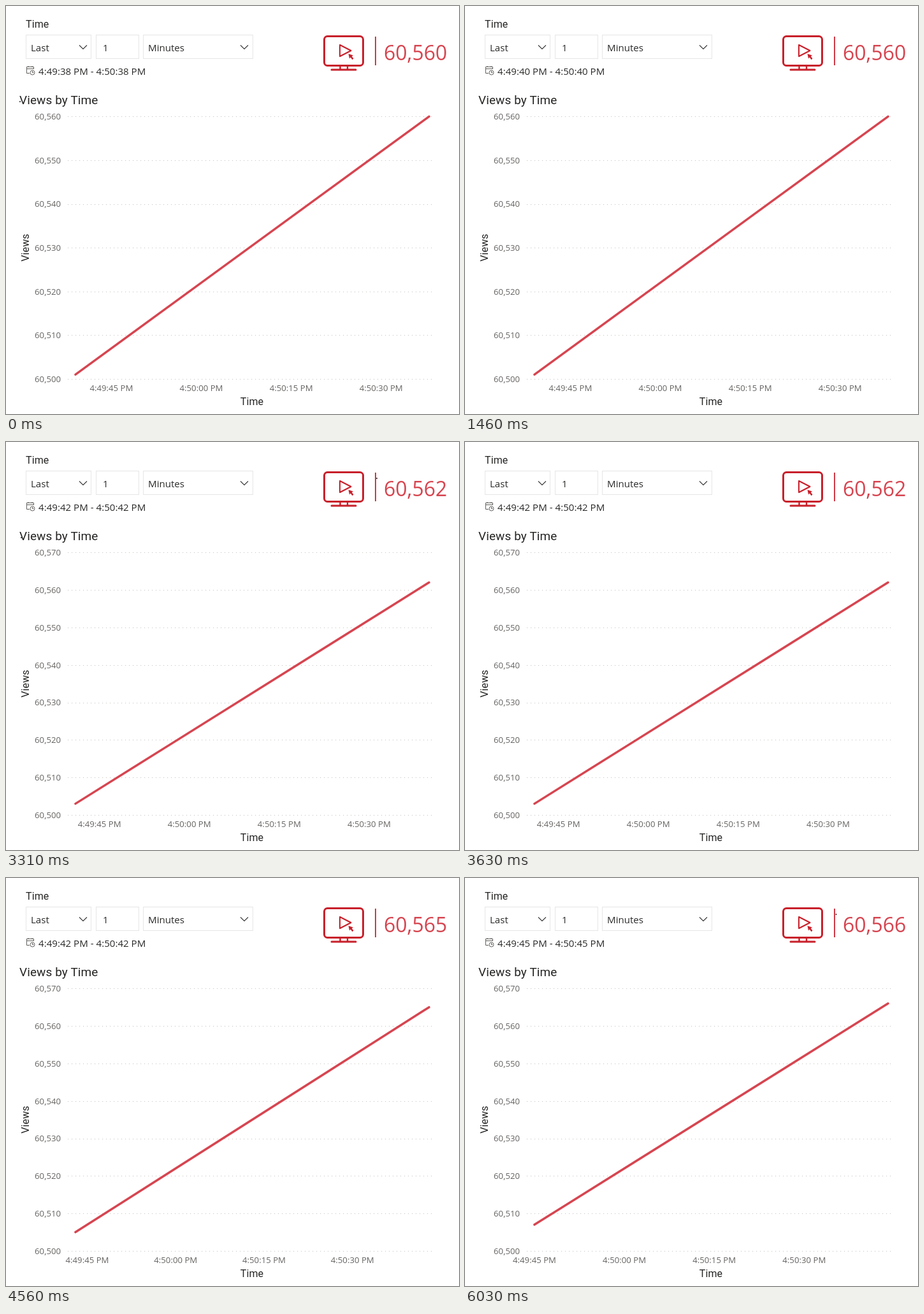
Write an HTML page that moves like this. It is 711 px wide and 640 px high and loops after 6.11 s.

```html
<!DOCTYPE html>
<html lang="en">
<head>
<meta charset="utf-8">
<title>Views by Time</title>
<style>
  html, body { margin: 0; width: 100%; height: 100%; overflow: hidden; background: #fff; }
  svg { display: block; width: 711px; height: 640px; }
  text { font: 15.1px "Open Sans", "Noto Sans", sans-serif; fill: #2b2a29; }
  .head { font: 16px Roboto, sans-serif; fill: #252423; letter-spacing: .1px; }
  .title { font-size: 19px; }
  .tick { font-size: 13.2px; fill: #666462; }
  .card { font-size: 32px; fill: #d64550; }
  .end { text-anchor: end; }
  .mid { text-anchor: middle; }
  .shape { fill: none; }
  .box { stroke: #e6e6e6; }
  .thin { stroke: #3b3a39; stroke-width: 1.1; }
  .small { stroke: #605e5c; stroke-width: 1; }
  .grid { stroke: #c8c6c4; stroke-dasharray: 1.2 4.8; }
  .icon { stroke: #c8202b; stroke-width: 3; stroke-linecap: round; stroke-linejoin: round; }
  .line { stroke: #d64550; stroke-width: 3.5; stroke-linecap: round; stroke-linejoin: round; }
</style>
</head>
<body>
<svg viewBox="0 0 711 640">
  <text class="head" x="31" y="34">Time</text>
  <g class="shape box">
    <rect x="31.5" y="45.5" width="102" height="37"/>
    <rect x="141.5" y="45.5" width="67" height="37"/>
    <rect x="215.5" y="45.5" width="172" height="37"/>
  </g>
  <text x="39" y="71">Last</text>
  <text x="152" y="71">1</text>
  <text x="223" y="71">Minutes</text>
  <path class="shape thin" d="M115 61.5l6 6 6-6M368 61.5l6 6 6-6"/>
  <path class="shape small" d="M37 105.5H32.5V95.5H43.5V99M32.5 98.5H43.5M35 94V96M41 94V96M41.5 102V104.5H43.5"/>
  <circle class="shape small" cx="41.5" cy="104.5" r="3.5"/>
  <text id="range" x="51" y="108"></text>

  <g class="shape icon">
    <rect x="499.5" y="47.5" width="61" height="46" rx="5"/>
    <path d="M511 100H549" />
    <path d="M524.5 94V99M536 94V99" stroke-width="2.5"/>
    <path d="M524 61V79L541.5 70Z" stroke-width="2"/>
  </g>
  <path d="M537.5 75L545 77.5 542.8 79 545.5 82.5 543.5 84.2 540.8 80.5 539 82.5Z" fill="#c8202b"/>
  <path d="M580 48V93" stroke="#cf3a45" stroke-width="2"/>
  <text id="card" class="card" x="593" y="85"></text>

  <text class="head title" x="21" y="154">Views by Time</text>
  <text class="head mid" x="386" y="626">Time</text>
  <text class="head mid" transform="translate(36 379) rotate(-90)">Views</text>
  <g id="axes"></g>
  <path id="line" class="shape line"/>
  <g id="dots"></g>
</svg>
<script>
const LOOP = 6110, LEFT = 109, WIDTH = 555, BOTTOM = 585, HEIGHT = 411.7, BASE = 60500;
const $ = id => document.getElementById(id);
const lerp = (a, b, p) => a + (b - a) * p;
const pad = n => String(n).padStart(2, '0');
const clock = s => `4:${49 + Math.floor(s / 60)}:${pad(s % 60)} PM`;

// [time, value] steps
const sliderStart = [[0, 38], [1230, 40], [3310, 42], [5340, 44], [6030, 45]];
const cardValue = [[0, 60], [1920, 62], [4020, 64], [4400, 65], [6030, 66]];

// start: first second after 4:49:00, span: seconds covered, max: top of the value axis
const charts = [
  { at: 0, start: 39, span: 59, max: 60, snap: true },
  { at: 1920, start: 41, span: 59, max: 70 },
  { at: 4020, start: 43, span: 59, max: 70 },
  { at: 4320, start: 43, span: 60, max: 70 },
  { at: 6030, start: 45, span: 59, max: 70, snap: true }
];
const MORPH = [.2, .5, .8, 1];

// Loading dots: [from, to, x, y]
const loading = [
  [0, 220, 22, 150], [1230, 1460, 22, 150], [3310, 3630, 24, 150],
  [1230, 1460, 581, 57], [3310, 3630, 582, 57], [4250, 4400, 580, 50],
  [5340, 5560, 584.5, 58], [6030, 6110, 582.5, 57]
];

const current = (steps, t) => steps.filter(s => s[0] <= t).pop()[1];
const chartX = (c, i) => LEFT + i * WIDTH / c.span;
const valueY = (c, v) => BOTTOM - v / c.max * HEIGHT;
const pointAt = (c, i) => [chartX(c, i), valueY(c, c.start - 38 + i)];

function axes(c) {
  let out = '';
  for (let v = 0; v <= c.max; v += 10) {
    const y = valueY(c, v);
    out += `<path class="grid" d="M97 ${Math.round(y) + .5}H671"/>` +
      `<text class="tick end" x="86" y="${y + 4.8}">${(BASE + v).toLocaleString('en-US')}</text>`;
  }
  for (let s = 45; s <= 90; s += 15)
    out += `<text class="tick mid" x="${chartX(c, s - c.start)}" y="604">${clock(s)}</text>`;
  return out;
}

function linePath(c, previous, p) {
  const points = [0, 59].map(i => {
    const from = pointAt(previous, i), to = pointAt(c, i);
    return [lerp(from[0], to[0], p), lerp(from[1], to[1], p)];
  });
  if (c.span > 59) points.push(pointAt(c, c.span));
  return 'M' + points.map(q => q.map(n => n.toFixed(2)).join(' ')).join('L');
}

let shown = -1;
function draw(now) {
  const t = now % LOOP;
  const index = charts.filter(c => c.at <= t).length - 1;
  const chart = charts[index];
  const step = Math.min(3, Math.floor((t - chart.at) / 78));
  const start = current(sliderStart, t);

  if (index !== shown) {
    $('axes').innerHTML = axes(chart);
    shown = index;
  }
  $('line').setAttribute('d', linePath(chart, charts[Math.max(0, index - 1)], chart.snap ? 1 : MORPH[step]));
  $('range').textContent = `${clock(start)} - ${clock(start + 60)}`;
  $('card').textContent = (BASE + current(cardValue, t)).toLocaleString('en-US');
  $('dots').innerHTML = loading.filter(d => t >= d[0] && t < d[1])
    .map(d => `<circle cx="${d[2]}" cy="${d[3]}" r="1.1" fill="#333"/>`).join('');
  requestAnimationFrame(draw);
}

const origin = performance.now();
const tick = draw;
draw = now => tick(Math.max(0, now - origin));
draw(origin);
</script>
</body>
</html>
```
